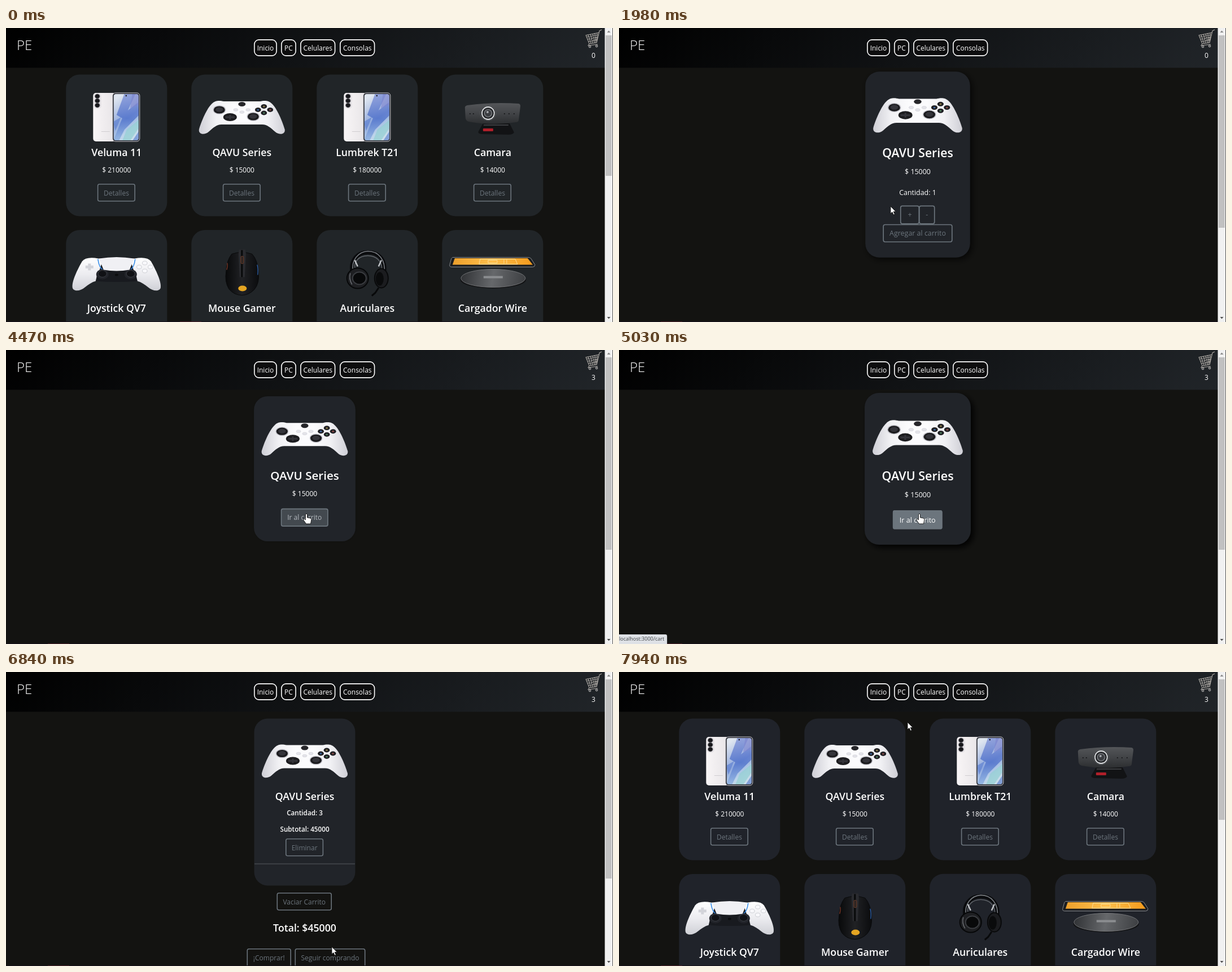
Animation of 1075x521 px, one loop 8000 ms. Source, as an HTML page with a canvas:

```html
<!DOCTYPE html>
<html lang="es">
<head>
<meta charset="utf-8">
<title>Tienda</title>
<style>
  html, body { margin: 0; width: 1075px; height: 521px; overflow: hidden; background: #131311; }
  canvas { display: block; }
</style>
</head>
<body>
<canvas id="stage" width="1075" height="521"></canvas>
<script>
const ctx = document.getElementById("stage").getContext("2d");
const LOOP = 8000, GREY = "#6c757d", MID = 529;
// Page changes
const OPEN = 1370, LOADED = 1570, ADDED = 3420, CART = 5440, LEAVE = 7340, HOME = 7550;

const clamp = v => Math.min(1, Math.max(0, v));
const ease = v => { v = clamp(v); return v * v * (3 - 2 * v); };
// Eased 0..1 hover amount for a pointer that enters and leaves at given times
const hover = (t, enter, leave, d = 400) =>
  ease((Math.min(t, leave) - enter) / d) * (1 - ease((t - leave) / d));
const during = (t, spans) => spans.find(([a, b]) => t >= a && t < b);

// ---------- drawing helpers ----------
function text(str, x, y, size = 12, weight = 400, color = "#fff", align = "center") {
  ctx.font = `${weight} ${size}px "Open Sans", "Noto Sans", sans-serif`;
  ctx.textAlign = align;
  ctx.fillStyle = color;
  ctx.fillText(str, x, y);
}
function rect(x, y, w, h, color) {
  ctx.fillStyle = color;
  ctx.fillRect(x, y, w, h);
}
function round(x, y, w, h, r, fill, stroke, line = 1.6) {
  ctx.beginPath();
  ctx.roundRect(x, y, w, h, r);
  if (fill) { ctx.fillStyle = fill; ctx.fill(); }
  if (stroke) { ctx.strokeStyle = stroke; ctx.lineWidth = line; ctx.stroke(); }
}
function oval(x, y, rx, ry, fill, stroke, line = 1) {
  ctx.beginPath();
  ctx.ellipse(x, y, rx, ry, 0, 0, 7);
  if (fill) { ctx.fillStyle = fill; ctx.fill(); }
  if (stroke) { ctx.strokeStyle = stroke; ctx.lineWidth = line; ctx.stroke(); }
}
function shape(d, fill, stroke, line = 1) {
  const path = new Path2D(d);
  if (fill) { ctx.fillStyle = fill; ctx.fill(path); }
  if (stroke) { ctx.strokeStyle = stroke; ctx.lineWidth = line; ctx.stroke(path); }
}
function gradient(x0, y0, x1, y1, ...colors) {
  const g = ctx.createLinearGradient(x0, y0, x1, y1);
  colors.forEach((c, i) => g.addColorStop(i / (colors.length - 1), c));
  return g;
}
function at(x, y, draw) {
  ctx.save();
  ctx.translate(x, y);
  draw();
  ctx.restore();
}
function button(label, x, y, w, h, base, lit = 0) {
  ctx.globalAlpha = lit;
  round(x, y, w, h, 3, GREY);
  ctx.globalAlpha = 1;
  round(x + .8, y + .8, w - 1.6, h - 1.6, 3, null, GREY);
  text(label, x + w / 2, base, 12, 400, GREY);
  ctx.globalAlpha = lit;
  text(label, x + w / 2, base);
  ctx.globalAlpha = 1;
}
function card(cx, y, h, lift, color, draw) {
  const cy = y + h / 2, scale = 1 + .05 * lift;
  ctx.save();
  ctx.translate(cx, cy);
  ctx.scale(scale, scale);
  ctx.translate(-cx, -cy);
  ctx.shadowColor = `rgba(0,0,0,${lift})`;
  ctx.shadowBlur = 12;
  ctx.shadowOffsetX = ctx.shadowOffsetY = 5 * lift;
  round(cx - 89.5, y, 179, h, 24, color);
  ctx.shadowColor = "transparent";
  draw();
  ctx.restore();
}

// ---------- products, drawn around their own centre ----------
function whitePad() {
  shape("M-53-24C-46-31-38-29-32-28L32-28C38-29 46-31 53-24C62-16 72 8 76 22C77 31 66 32 59 26C51 19 45 13 36 13L-36 13C-45 13-51 19-59 26C-66 32-77 31-76 22C-72 8-62-16-53-24Z",
    gradient(-76, 0, 76, 0, "#cfcfd6", "#f1f1f4", "#fbfbfd", "#fbfbfd", "#f1f1f4", "#cfcfd6"));
  for (const [x, y] of [[-40, -13], [20, -1]]) {
    oval(x, y, 11.5, 8, "#c6c6cd");
    oval(x, y, 10, 6.6, "#1b1b1e");
    oval(x, y - .5, 6.5, 4, "#34343a");
  }
  oval(-21, 0, 12, 7, "#1d1d20");
  shape("M-29 0H-13M-21-4V4", null, "#34343a", 3);
  oval(0, -23, 6.5, 4, "#26262a");
  [[39, -19, "#8a7a48"], [28.5, -13, "#3f68a0"], [50, -13, "#8a4a48"], [39, -7.5, "#4b7a5a"]].forEach(([x, y, c]) => {
    oval(x, y, 5.4, 3.9, "#1f1f23");
    oval(x, y, 1.8, 1.5, c);
  });
  for (const [x, y] of [[-11, -13], [11, -13], [0, -9]]) oval(x, y, 4, 2.3, "#e3e3e9", "#cfcfd6", .6);
}
function phone() {
  round(-41.5, -43, 40, 86, 5, gradient(-41, 0, 0, 0, "#f8f5f6", "#e6e3e6"));
  round(-40, -42, 13, 27, 5, "#e6e3e6");
  for (const y of [-37, -29, -21]) oval(-34, y, 4.3, 4, "#17171b", "#77777d", .8);
  rect(-27, 25, 15, 1, "#d0cdd0");
  round(-7, -43, 48, 86, 5, "#2a2b31", "#c9c9d0", 1);
  ctx.save();
  ctx.beginPath();
  ctx.roundRect(-5, -41, 44, 82, 4);
  ctx.clip();
  rect(-6, -42, 47, 84, gradient(-6, -30, 40, 36, "#dfe6f0", "#b9c8e6", "#8ea8dd", "#bcd3ea", "#cfe2ea"));
  ctx.globalAlpha = .65;
  shape("M14-42L34-42 20-12 38-26 40-4 14 22 4 42-6 42 10 2 0-4Z", gradient(20, -40, 0, 40, "#6f83d2", "#3f63c6", "#7fa6de"));
  shape("M28-42L40-42 40-22 24-16Z", "#7f86d0");
  shape("M40 4L18 22 10 42 24 42 40 18Z", "#8fd0d2");
  shape("M-6 8L8 0-2 24ZM28 42L40 24V42Z", "#5b7fd0");
  ctx.restore();
  oval(17, -38, 1.2, 1.2, "#111");
}
function webcam() {
  shape("M-17 11H30L38 27Q36 31 28 31L-20 30Q-27 29-25 25Z", "#121315");
  shape("M-45-21Q0-27 46-24Q50-23 49-18L46 6Q45 9 41 9Q0 16-42 8Q-47 7-48 2L-49-17Q-49-20-45-21Z",
    gradient(0, -24, 0, 12, "#535558", "#414346", "#2c2e30"));
  oval(-8, -7, 13.5, 13, "#1b1c1e", "#5d6064", 1);
  oval(-8, -7, 11, 11, "#2a2c2f", "#dfe1e3", 1.8);
  oval(-8, -7, 6.5, 6.5, "#3c3e42", "#8b8e92", 1.2);
  oval(-9, -9, 2, 2, "#a5a8ad");
  for (const x of [-41, -35, 20, 28, 37]) rect(x, -7, 2, 2, "#1b1c1e");
  round(-17, 20, 18, 5, 1, "#b01f2a");
  shape("M-16 14H28", null, "#3b3d40", 2);
}
function duoPad() {
  shape("M-44-25Q0-31 44-25L38 15Q0 18-38 15Z", "#181a1f");
  const white = gradient(0, -26, 0, 32, "#fff", "#ececf0", "#cfd0d6");
  for (const side of [1, -1]) {
    ctx.save();
    ctx.scale(side, 1);
    shape("M-32-25Q-54-29-61-20C-69-6-80 16-78 27C-76 34-64 33-56 26C-50 21-44 17-37 15C-35 8-35 0-30-5L-24-24Z", white);
    shape("M-33-24Q-31-8-23-4", null, "#3189e8", 1.6);
    oval(-25, 3, 11, 9, "#22242a");
    oval(-25, 2, 7.5, 6, "#101115", "#3c3f46", 1);
    ctx.restore();
  }
  shape("M-31-25Q0-30 31-25L23-5Q0-1-23-5Z", "#f0f0f4");
  shape("M-48-16V-4M-55-10H-41", null, "#d3d4da", 5);
  for (const [x, y] of [[50, -17], [40, -10], [60, -10], [50, -3]]) oval(x, y, 4.3, 3.4, "#f8f8fb", "#c3c4cb", .8);
  oval(0, 4, 3, 2, "#0b0c0e");
}
function mouse() {
  shape("M-18-33Q0-39 18-33Q28-22 29-2Q32 18 22 30Q12 40 0 40Q-14 40-23 29Q-31 16-28-2Q-27-22-18-33Z",
    gradient(-28, 0, 28, 0, "#090a0b", "#202124", "#0c0d0f"), "#08090a");
  shape("M-6-34L-5-41H6L7-34 5 8H-4Z", "#2a2b2f");
  shape("M0-40V8", null, "#08090a", 3);
  round(-2, -29, 5, 13, 2, "#2e2522", "#6d3d2a", 1);
  shape("M-27-5Q-25-12-26-17", null, "#8a3d2a", 1.2);
  shape("M28 4Q29-8 27-14", null, "#2f68b8", 1.2);
  oval(1, 28, 7.5, 5, "#e5a522");
}
function headset() {
  shape("M-25 4C-33-20-18-36 1-36C22-36 36-20 28 8", null, "#0a0b0d", 7);
  shape("M-25-2C-29-22-16-37 1-38C20-38 33-22 30 0", null, "#777b80", 1.6);
  shape("M-22-8C-24-20-14-30 1-30C16-30 26-20 26-6", null, "#63676c", 1.4);
  shape("M-22-22L-17-11M25-22L20-11", null, "#c3c6ca", 2.4);
  oval(25, 10, 12, 17, "#1b1c1f", "#08090a", 2);
  oval(22, 11, 7, 12, "#0a0b0c");
  oval(-17, 10, 19, 18, "#1e1f22", "#060708", 2);
  oval(-14, 10, 12, 11, "#08090a", "#3a3c40", 2);
  shape("M-30 1Q-33 11-27 21", null, "#6a6d72", 1.5);
  shape("M20 27L14 36 8 41", null, "#08090a", 3);
}
function charger() {
  oval(1, 13, 58, 15, "#131416");
  oval(1, 10, 57, 16, gradient(-57, 0, 57, 20, "#2f3134", "#66686b", "#3d3f42"), "#808285", .8);
  rect(-16, 6, 34, 4, "#8b8d90");
  shape("M-71-27H63Q66-27 68-25L75-14Q75-10 71-10H-72Q-77-10-76-14L-73-25Z", "#1b1d20", "#a5a7ab", .8);
  shape("M-67-25.5H62L71-14H-71Z", gradient(-70, 0, 70, 0, "#eda02c", "#ffc04d", "#f39a1c"));
  shape("M-22-24H40L44-15H-24ZM-8-22H8V-17H-8ZM20-23V-16M25-23V-16", null, "#ffdc96", 1);
}

const products = [
  ["Veluma 11", "210000", phone], ["QAVU Series", "15000", whitePad],
  ["Lumbrek T21", "180000", phone], ["Camara", "14000", webcam],
  ["Joystick QV7", "", duoPad], ["Mouse Gamer", "", mouse],
  ["Auriculares", "", headset], ["Cargador Wire", "", charger],
];
const PAD = products[1][0];

// ---------- pages ----------
function homePage(t) {
  const first = t < OPEN;
  const lifts = first
    ? { 1: hover(t, 1100, 9000), 2: hover(t, 880, 1010), 3: hover(t, 650, 850) }
    : { 6: hover(t, HOME, 7650) };
  const color = first ? "#212528" : "#20232a";
  products.forEach(([name, price, draw], i) => {
    const cx = 195.8 + 222 * (i % 4), dy = i < 4 ? 0 : 275.5;
    card(cx, 82.5 + dy, 251, lifts[i] || 0, color, () => {
      at(cx, 158 + dy, draw);
      text(name, cx, 227 + dy, 17.7, 600);
      if (!price) return;
      text("$ " + price, cx, 255.5);
      button("Detalles", cx - 34, 276, 67.2, 31.5, 297, first && i === 1 ? hover(t, 1130, 9000, 150) : 0);
    });
  });
}
function detailPage(t) {
  card(MID, 83, 318, hover(t, 1720, 9000), "#212429", () => {
    at(MID, 157.5, whitePad);
    text(PAD, MID, 229.6, 20.5, 600);
    text("$ 15000", MID, 258.3);
    text("Cantidad: " + (t < 2500 ? 1 : t < 2850 ? 2 : 3), MID, 294);
    button("-", 531, 312, 27.5, 32, 332);
    button("Agregar al carrito", 469.5, 344, 119, 31, 364, hover(t, 3300, 9000, 150));
    if (t > 2450) round(498, 311.5, 34.5, 33, 4, null, "rgba(108,117,125,.5)", 4);
    button("+", 499, 312, 33, 32, 332, hover(t, 2110, 3290, 150));
  });
}
function addedPage(t) {
  const lift = t < 4000 ? 1 - ease((t - ADDED) / 380) : hover(t, 4400, 9000);
  card(MID, 82.5, 256, lift, "#212429", () => {
    at(MID, 157.5, whitePad);
    text(PAD, MID, 230, 20.5, 600);
    text("$ 15000", MID, 258.5);
    button("Ir al carrito", 487, 280.5, 83.5, 32, 301, hover(t, 4400, 9000, 150));
  });
}
function cartPage(t) {
  card(MID, 82.5, 296, hover(t, CART, 6290), "#212429", () => {
    at(MID, 157.5, whitePad);
    text(PAD, MID, 227, 17.7, 600);
    text("Cantidad: 3", MID, 254, 11.7, 600);
    text("Subtotal: 45000", MID, 282.5, 11.7, 600);
    button("Eliminar", 495, 295, 67.2, 31.5, 316);
    rect(440, 339.5, 178, 1, "#565a60");
  });
  button("Vaciar Carrito", 479.5, 391, 97.5, 31.5, 412);
  text("Total: $45000", MID, 460, 17.7, 600);
  button("¡Comprar!", 426.5, 490, 78.5, 34, 511);
  button("Seguir comprando", 511.5, 490, 125, 34, 511, hover(t, 6870, 9000, 150));
}

// ---------- frame around the pages ----------
function header(t) {
  rect(0, 0, 1061, 70.5, gradient(247, -248, 813, 318, "#000", "#212529"));
  text("PE", 19, 38.5, 24, 300, "#fff", "left");
  for (const [label, x, w] of [["Inicio", 439, 41], ["PC", 487, 27], ["Celulares", 521, 62.5], ["Consolas", 591, 62.5]]) {
    round(x + .9, 20.9, w - 1.8, 28.2, 8, "#0d0d0e", "#fff", 1.6);
    text(label, x + w / 2, 39.5);
  }
  shape("M1055 3L1051 5 1046 26 1033 28 1027 13 1051 8M1028 16L1050 12M1030 20L1049 16M1031 24L1048 20M1031 12L1036 27M1035 11L1039 27M1039 10L1042 26M1043 9L1044 26M1047 9L1046 25M1033 28L1031 31 1048 29",
    null, "#a9a5a0", 1.1);
  oval(1034, 33, 1.8, 1.8, "#444", "#bbb");
  oval(1046, 32, 1.8, 1.8, "#444", "#bbb");
  text(t < ADDED ? "0" : "3", 1040.5, 53);
}
function scrollbar(end) {
  rect(1060.5, 0, 13.8, 521, "#f1f1f1");
  rect(1062, 13, 10.8, end - 13, "#c1c1c1");
  shape("M1064.5 8L1067.5 4.5 1070.5 8Z", "#8a8a8a");
  shape("M1064.5 512L1067.5 515.5 1070.5 512Z", "#505050");
}
const links = [
  [1220, OPEN, "localhost:3000/producto/5bI9y0RcW9hJT8uhFuh3"],
  [4540, CART, "localhost:3000/cart"],
  [6950, LEAVE, "localhost:3000"],
];
function statusBar(t) {
  const link = during(t, links);
  if (!link) return;
  ctx.globalAlpha = clamp((t - link[0]) / 220);
  ctx.font = '9px "Open Sans", "Noto Sans", sans-serif';
  round(-4, 504, ctx.measureText(link[2]).width + 9, 20, 3, "#dee1e6");
  text(link[2], 0, 515, 9, 400, "#3c4043", "left");
  ctx.globalAlpha = 1;
}

// ---------- pointer ----------
const route = [
  [390, 1022, 500], [600, 1000, 330], [850, 785, 260], [1080, 520, 280], [1230, 428, 288], [1300, 425, 288],
  [1570, 425, 288], [1800, 455, 302], [2100, 498, 325], [2330, 518, 327], [3180, 520, 326], [3380, 530, 362],
  [3990, 530, 364], [4200, 545, 354], [4390, 533, 338], [4460, 532, 290], [5440, 532, 290],
  [5650, 551, 291], [5780, 566, 296], [6300, 581, 385], [6450, 582, 440], [6840, 577, 487], [7000, 575, 500],
  [7400, 575, 500], [7650, 545, 355], [7940, 511, 89],
];
const clicks = [[1260, 1370], [2430, 2520], [2780, 2870], [3330, 3430], [5330, 5430], [7250, 7340]];
const overButton = [[1130, OPEN], [2110, ADDED], [4400, CART], [6870, LEAVE]];
function pointer(t) {
  if (t < route[0][0]) return;
  let i = route.findIndex(p => p[0] > t);
  if (i < 0) i = route.length - 1;
  const [t0, x0, y0] = route[i - 1], [t1, x1, y1] = route[i];
  const k = clamp((t - t0) / (t1 - t0));
  at(x0 + (x1 - x0) * k, y0 + (y1 - y0) * k, () => {
    if (during(t, clicks)) oval(0, 0, 10, 10, "rgba(190,192,45,.92)");
    shape(during(t, overButton)
      ? "M-1.5 1.2Q0-.8 1.5 1.2V7L7 8Q9 8.5 8.8 11L7.5 18H-.5L-5 11.5Q-5.5 9-3.5 9.5L-1.5 11Z"
      : "M0 0V13L3 10.3 5.2 15.2 7.4 14.2 5.2 9.5H9.3Z", "#fff", "#111", .9);
  });
}

function draw(t) {
  rect(0, 0, 1075, 521, "#131311");
  header(t);
  let end = 354;
  if (t < OPEN || t >= HOME) { homePage(t); end = 262; }
  else if (t >= LOADED && t < ADDED) detailPage(t);
  else if (t >= ADDED && t < CART) addedPage(t);
  else if (t >= CART && t < LEAVE) { cartPage(t); end = 366; }
  rect(0, 520, 1061, 1, "#17121c");
  rect(t < 390 ? 308 : 74, 520, 38, 1, "#4a1f2a");
  scrollbar(end);
  statusBar(t);
  pointer(t);
}

const start = performance.now();
function tick() {
  draw((performance.now() - start) % LOOP);
  requestAnimationFrame(tick);
}
tick();
</script>
</body>
</html>
```
